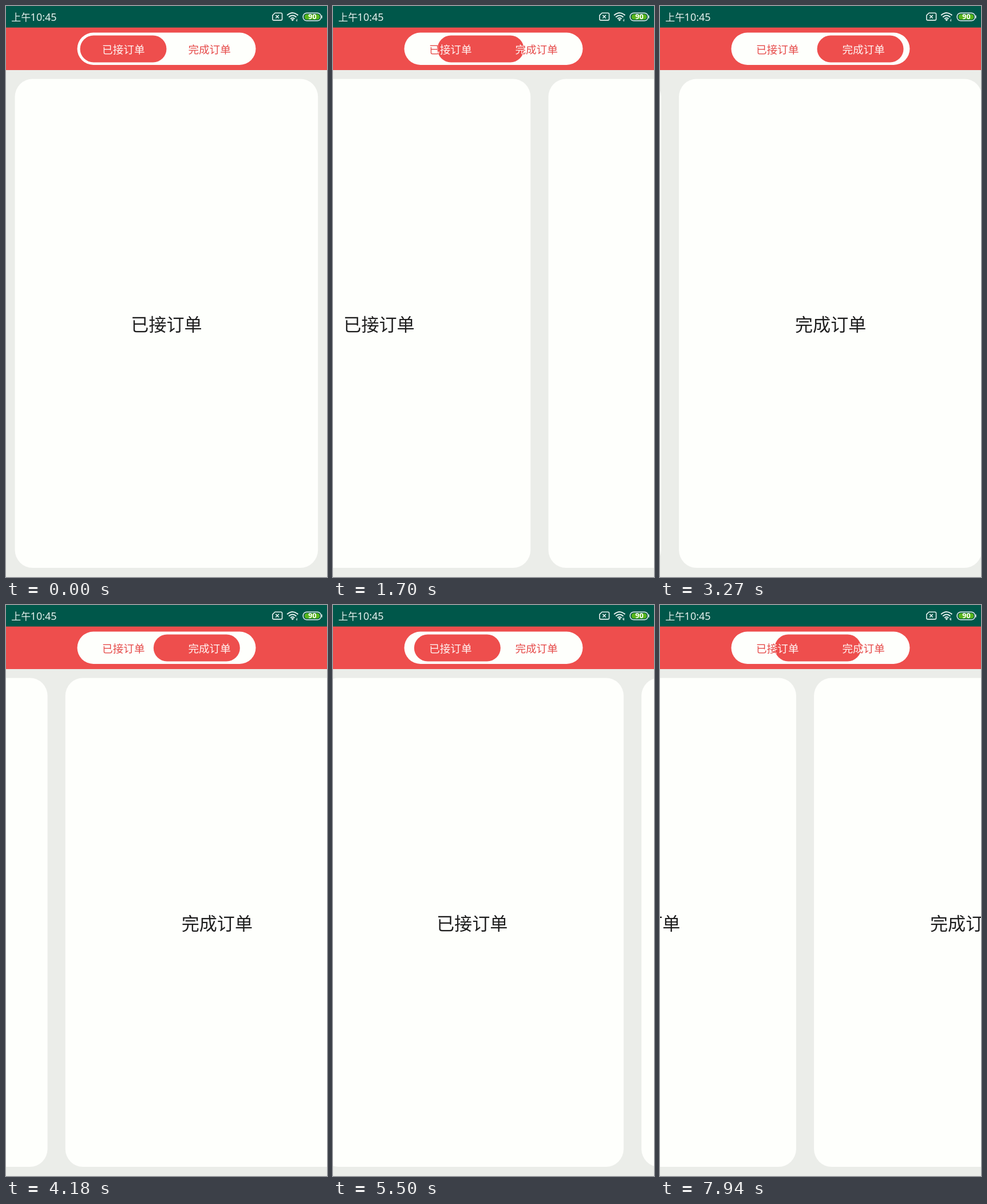
Recreate the animation shown at these times as an HTML page. Size 561 by 998 pixels, loop 7.99 s.

```html
<!DOCTYPE html>
<html lang="zh-CN">
<head>
<meta charset="utf-8">
<title>订单</title>
<style>
  html, body { margin: 0; width: 100%; height: 100%; overflow: hidden; background: #ebede9; }
  svg { display: block; width: 100%; height: 100%; }
  text { font-family: "Noto Sans CJK SC", "Noto Sans CJK", "Noto Sans SC", sans-serif; }
  .title { font-size: 31.1px; fill: #1e1e1e; text-anchor: middle; }
  .tab { font-size: 18.6px; text-anchor: middle; }
  .card { fill: #fefffc; }
  .line { fill: none; stroke: #e6f0ee; }
</style>
</head>
<body>
<svg viewBox="0 0 561 998">
  <defs>
    <clipPath id="thumbClip"><rect id="clipBox" y="51.5" width="151" height="47" rx="23.5"/></clipPath>
    <g id="labels">
      <text class="tab" x="205.3" y="82.6">已接订单</text>
      <text class="tab" x="355.6" y="82.6">完成订单</text>
    </g>
  </defs>
  <rect width="561" height="998" fill="#ebede9"/>

  <g id="pages">
    <rect class="card" x="15.6" y="127.5" width="529.6" height="854.5" rx="31"/>
    <text class="title" x="280.5" y="567.6">已接订单</text>
    <rect class="card" x="576.4" y="127.5" width="529.6" height="854.5" rx="31"/>
    <text class="title" x="841.5" y="567.6">完成订单</text>
  </g>

  <rect y="37" width="561" height="75" fill="#ee4e4d"/>
  <rect x="124.5" y="46.5" width="312" height="56.5" rx="28.2" fill="#fefffc"/>
  <use href="#labels" fill="#e64b4a"/>
  <rect id="thumb" y="51.5" width="151" height="47" rx="23.5" fill="#ee4e4d"/>
  <g clip-path="url(#thumbClip)"><use href="#labels" fill="#fff4f2"/></g>

  <!-- status bar -->
  <rect width="561" height="37.6" fill="#00574a"/>
  <g fill="#e6f0ee">
    <text x="9.3" y="25.6" font-size="17">上午</text>
    <text x="42.6" y="26" font-size="18" style="font-family:'Noto Sans',sans-serif">10:45</text>
  </g>
  <path class="line" stroke-width="1.6" stroke-linejoin="round"
    d="M470 12.3H480.5Q482.6 12.3 482.6 14.4V22.8Q482.6 24.9 480.5 24.9H468Q465.9 24.9 465.9 22.8V16.4Z"/>
  <path class="line" stroke-width="1.5" d="M471.3 15.9l5.6 5.6m0-5.6l-5.6 5.6"/>
  <g class="line" stroke-width="2">
    <path d="M491.2 16.3Q500.8 7.6 510.4 16.3"/>
    <path d="M494.2 19.4Q500.8 13.6 507.4 19.4"/>
    <path d="M497.2 22.4Q500.8 19.2 504.4 22.4"/>
  </g>
  <path d="M498.3 23.8Q500.8 21.8 503.3 23.8L500.8 26.6Z" fill="#e6f0ee"/>
  <path class="line" stroke-width="1" d="M508.4 22.6v4m-1.6-1.6l1.6 1.7"/>
  <path id="upArrow" class="line" stroke-width="1" d="M506.9 26.2v-3.8"/>
  <rect class="line" x="519.2" y="12.2" width="31.4" height="13.6" rx="6.4" stroke-width="1.5"/>
  <path class="line" stroke-width="1.4" d="M552 16.6v4.8"/>
  <rect x="521.6" y="14.3" width="26.8" height="9.4" rx="4.5" fill="#58b51c"/>
  <text x="535.4" y="23.4" font-size="12.5" font-weight="700" fill="#fff" text-anchor="middle"
    style="font-family:'Noto Sans',sans-serif">90</text>
</svg>
<script>
  const LOOP = 7990, WIDTH = 561, STEP = 41.36, LAG = 18;
  const $ = id => document.getElementById(id);
  const pages = $("pages"), thumb = $("thumb"), clipBox = $("clipBox"), upArrow = $("upArrow");

  // Finger drags as [time, scroll] points; each ends in a settle to a page.
  const dragOut = [[520, 0], [1700, 200], [2650, 365], [3080, 440]];
  const dragBack = [[3795, 561], [4180, 473], [5050, 258], [5340, 186]];

  const along = (points, t) => {
    let i = 1;
    while (i < points.length - 1 && t > points[i][0]) i++;
    const [t0, a] = points[i - 1], [t1, b] = points[i];
    return a + (b - a) * (t - t0) / (t1 - t0);
  };

  const settle = (t, start, length, from, to) => {
    const p = Math.min(1, Math.max(0, (t - start) / length));
    return from + (to - from) * (1 - (1 - p) ** 5);
  };

  function scrollAt(t) {
    if (t < 520) return 0;
    if (t < 3080) return along(dragOut, t);
    if (t < 3795) return settle(t, 3080, 600, 440, WIDTH);
    if (t < 5340) return along(dragBack, t);
    if (t < 6511) return settle(t, 5340, 600, 186, 0);
    if (t < 6924) return settle(t, 6511, 200, 0, WIDTH);
    if (t < 7795) return settle(t, 6924, 200, WIDTH, 0);
    return 307 * ((t - 7795) / 150) ** 1.2;
  }

  function draw(time) {
    // The screen refreshes about 24 times a second.
    const t = Math.floor(time / STEP + 0.05) * STEP + 4;
    pages.setAttribute("transform", `translate(${-scrollAt(t).toFixed(2)} 0)`);
    // The tab thumb trails the page by one display refresh.
    const x = 129.5 + 151 * scrollAt(t - LAG) / WIDTH;
    thumb.setAttribute("x", x);
    clipBox.setAttribute("x", x);
    const busy = (t > 4800 && t < 7190) || t > 7810;
    upArrow.setAttribute("visibility", busy ? "visible" : "hidden");
  }

  const begin = performance.now();
  function tick() {
    draw((performance.now() - begin) % LOOP);
    requestAnimationFrame(tick);
  }
  tick();
</script>
</body>
</html>
```
